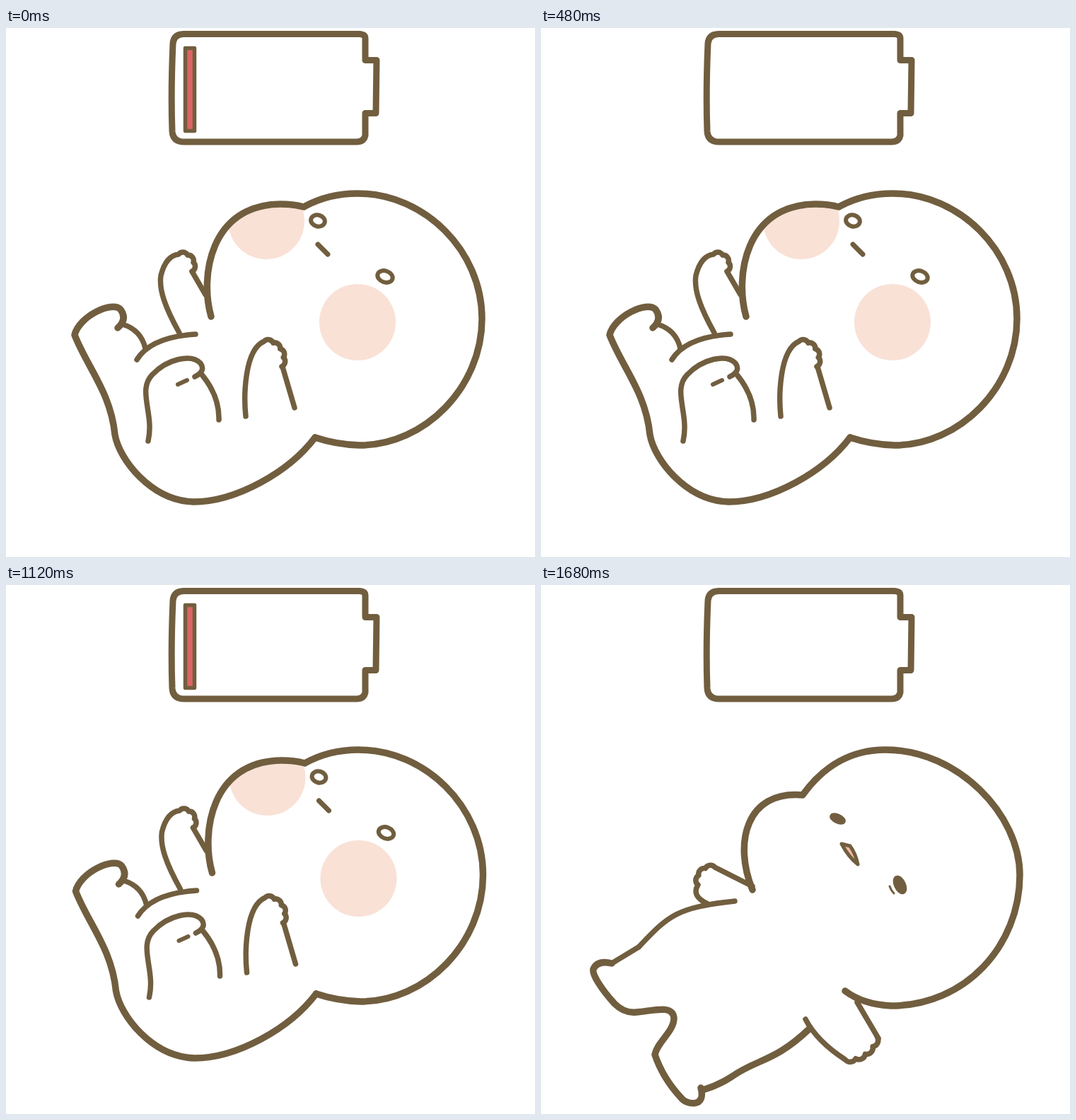
Write an HTML page that moves like this. It is 748 px wide and 748 px high and loops after 2280 ms.

```html
<!DOCTYPE html>
<html lang="en">
<head>
<meta charset="utf-8">
<title>Low battery</title>
<style>
  html, body { margin: 0; width: 100%; height: 100%; overflow: hidden; background: #fff; }
  svg { display: block; width: 100vw; height: 100vh; }
  .ink { fill: none; stroke: #715e3f; stroke-linecap: round; stroke-linejoin: round; }
</style>
</head>
<body>
<svg viewBox="0 0 748 748">
  <clipPath id="face"><path id="faceShape"/></clipPath>
  <g class="ink" stroke-width="9">
    <path d="M236 22Q237 9 251 8.500H500Q508 9 508 15V45.500H524L523 120.500H508V152Q506 161.500 495 161H252Q236 161 235 146Q233 90 236 22Z"/>
    <rect id="charge" x="253.500" y="28.500" width="13" height="117" stroke-width="5.500" style="fill:#de6464"/>
  </g>
  <g id="baby">
    <g id="cheeks" clip-path="url(#face)"><circle r="54"/><circle r="54"/></g>
    <g id="lines" class="ink"></g>
    <g id="eyes" class="ink" stroke-width="6"><ellipse/><ellipse/></g>
    <path id="lash" class="ink" stroke-width="3" d="M493 426Q495 432 499 436"/>
  </g>
</svg>
<script>
const $ = id => document.getElementById(id);
const newPath = () => document.createElementNS('http://www.w3.org/2000/svg', 'path');
const set = (el, attrs) => { for (const k in attrs) el.setAttribute(k, attrs[k]); };
const mix = (a, b, t) => a + (b - a) * t;

// A row of knuckles: equal arcs whose heading turns by a fixed angle (degrees).
function knuckles(n, size, heading, turn) {
  let d = '';
  for (let i = 0; i < n; i++) {
    const a = (heading + i * turn) * Math.PI / 180;
    d += `a${size * 0.6} ${size * 0.6} 0 0 ${turn > 0 ? 1 : 0} ${size * Math.cos(a)} ${size * Math.sin(a)}`;
  }
  return d;
}

// Eyes: x, y, rx, ry, angle. Cheeks: x, y.
const curled = {
  head: 'M290 408C274 352 288 250 388 249Q406 249 421 253Q455 234 497 234C592 234 673 315 673 411C673 508 592 590 500 590Q467 589 437 579',
  body: 'M437 579C400 628 325 670 265 670C205 668 160 610 154 575C148 515 115 480 97 434C103 408 150 385 162 398Q172 412 158 424',
  thigh: 'M165 419Q191 427 197 453',
  back: 'M185 469Q205 437 268 433',
  farArm: 'M245 431C225 395 216 370 219 350Q226 322 244 320' + knuckles(3, 13, 5, 47) + 'L282 377',
  shin: 'M201 584C210 545 185 512 207 490C228 468 262 460 275 474Q283 485 267 493',
  calf: 'M276 489Q302 520 301 554',
  crease: 'M243 504L256 498',
  nearArm: 'M339 549C336 520 337 455 365 443' + knuckles(4, 13, 10, 30),
  wrist: 'M391 479L408 537',
  mouth: 'M441 306L455 320',
  eyes: [[441, 272.5, 10, 8, 15], [536, 351.5, 11, 8, 20]],
  cheeks: [[368, 273], [497, 416]],
};
const sagging = {
  head: 'M293 415C274 357 288 255 390 254Q402 255 413 258Q450 235 493 234C590 234 673 315 673 412C673 508 590 590 505 590Q470 590 440 578',
  body: 'M440 578C400 626 320 668 275 668C215 664 164 620 159 565C153 530 120 517 100 506Q86 500 91 475C97 432 132 415 145 442',
  thigh: 'M145 442Q174 432 194 456',
  back: 'M187 469Q212 435 269 431',
  farArm: 'M243 431C205 405 203 345 232 338' + knuckles(4, 13.5, 0, 30) + 'Q272 384 285 393',
  shin: 'M209 615L210 604C180 588 192 522 236 521Q260 522 266 545',
  calf: 'M266 538C295 536 313 565 303 589',
  crease: 'M261 569Q260 580 251 583',
  nearArm: 'M350 555C372 520 362 480 375 468Q382 462 392 464' + knuckles(5, 12.7, 20, 22),
  wrist: 'M416 513Q421 535 415 556',
  mouth: 'M436 311L453 329',
  eyes: [[434, 279, 9.5, 6, 25], [528, 360.5, 11, 7, 50]],
  cheeks: [[362, 279], [491.5, 422]],
};
const flat = {
  head: 'M299 431C272 365 290 290 370 297C400 255 440 233 487 233C590 233 677 325 677 410C677 510 600 595 495 595Q455 593 430 574',
  body: 'M380 627C330 675 305 670 270 695Q250 708 229 714L226 711C234 740 205 735 198 725Q172 697 161 664C165 645 188 632 188 612C186 592 155 603 135 604Q118 606 104 592C84 570 72 550 74 543Q80 530 100 535',
  thigh: 'M100 535L138 512',
  back: 'M138 512C180 468 190 456 274 447',
  farArm: 'M236 451Q212 440 222 424' + knuckles(3, 13.6, -86, 40) + 'L299 426',
  nearArm: 'M374 614Q390 645 430 671' + knuckles(4, 15, -5, -20),
  wrist: 'M477 641L447 590',
  mouth: 'M425 366L437 369Q445 380 448 395Q435 385 425 366Z',
  eyes: [[419.5, 330.5, 9, 4, 25], [507.5, 424, 5.5, 11, -25]],
  cheeks: [[320, 340], [470, 480]],
};
const widths = { head: 9.5, body: 9.5, crease: 6 };
const parts = Object.keys(curled).filter(k => typeof curled[k] === 'string');

function sample(d, n) {
  const path = newPath();
  path.setAttribute('d', d);
  const len = path.getTotalLength();
  return Array.from({ length: n + 1 }, (_, i) => path.getPointAtLength(len * i / n));
}

function morph(from, to, t) {
  if (t === 0) return from;
  if (t === 1 || !to) return to || '';
  const a = sample(from, 90), b = sample(to, 90);
  return 'M' + a.map((p, i) => `${mix(p.x, b[i].x, t)} ${mix(p.y, b[i].y, t)}`).join('L');
}

// Steps 0-15 tremble in a cycle of three; 16-20 slump from sagging to flat.
function pose(i) {
  if (i < 16) return { ...curled, t: 0, tint: '#f9e1d6', shift: 1 - Math.cos(i * Math.PI * 2 / 3), charged: i >> 2 !== 1 };
  const u = (i - 16) / 4, t = u * (1.3 - 0.3 * u);
  const s = { t, tint: '#fce7df', shift: 0, charged: false };
  for (const k of parts) s[k] = morph(sagging[k], flat[k], t);
  for (const k of ['eyes', 'cheeks'])
    s[k] = sagging[k].map((v, n) => v.map((x, j) => mix(x, flat[k][n][j], t)));
  return s;
}

const strokes = {};
for (const k of parts) {
  strokes[k] = $('lines').appendChild(newPath());
  strokes[k].setAttribute('stroke-width', widths[k] || 7.5);
}

function show(s) {
  const open = s.t > 0.8;
  for (const k of parts) strokes[k].setAttribute('d', s[k]);
  set(strokes.mouth, { fill: open ? '#f3b9a6' : 'none', 'stroke-width': open ? 5 : 7 });
  set($('faceShape'), { d: s.head + 'Z' });
  set($('baby'), { transform: `translate(${s.shift} ${-s.shift / 1.5})` });
  set($('cheeks'), { fill: s.tint, opacity: 1 - s.t });
  s.cheeks.forEach(([cx, cy], i) => set($('cheeks').children[i], { cx, cy }));
  s.eyes.forEach(([cx, cy, rx, ry, a], i) => set($('eyes').children[i], { cx, cy, rx, ry, transform: `rotate(${a} ${cx} ${cy})` }));
  $('eyes').style.fill = open ? '#715e3f' : 'none';
  set($('lash'), { visibility: s.t === 1 ? 'visible' : 'hidden' });
  set($('charge'), { visibility: s.charged ? 'visible' : 'hidden' });
}

const poses = Array.from({ length: 21 }, (_, i) => pose(i));
const stepAt = t => t < 1280 ? Math.floor(t / 80) : Math.min(20, 16 + Math.floor((t - 1280) / 100));

const start = performance.now();
let current = -1;
function tick() {
  const i = stepAt((performance.now() - start) % 2280);
  if (i !== current) show(poses[current = i]);
  requestAnimationFrame(tick);
}
tick();
</script>
</body>
</html>
```
